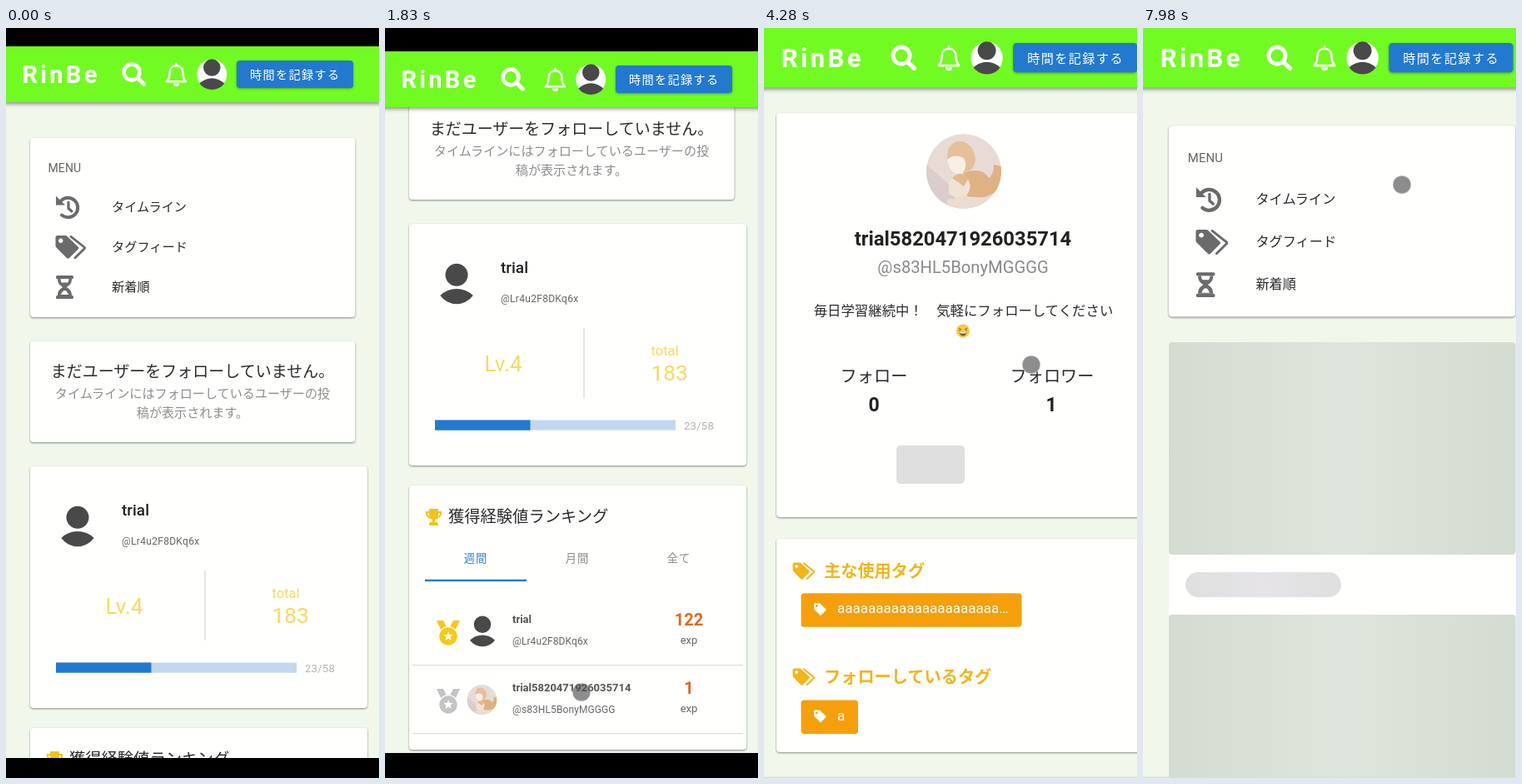
Animation of 448 by 900 pixels, one loop 8 s. Source, as an HTML page:

```html
<!DOCTYPE html>
<html lang="ja">
<head>
<meta charset="utf-8">
<style>
html, body { margin: 0; width: 100%; height: 100%; overflow: hidden; background: #000; }
svg { display: block; width: 448px; height: 900px; font-family: Roboto, "Noto Sans CJK JP", "Noto Sans CJK", sans-serif; }
.card { fill: #fffffe; filter: drop-shadow(0 1.5px 1.2px rgba(0,0,0,.46)); }
.raised { filter: drop-shadow(0 1.5px 1.5px rgba(0,0,0,.35)); }
.bar { filter: drop-shadow(0 2px 2.5px rgba(0,0,0,.45)); }
</style>
</head>
<body>
<svg id="screen" viewBox="0 0 448 900"></svg>
<script>
const ZOOM = 1.066, LOOP = 8000;
const BLUE = '#2379cf', GRAY = '#6b6b6b', GOLD = '#f4b41a', YELLOW = '#f6da5f', ORANGE = '#f5a00b', LIME = '#72fb22', PAGE = '#f1f8eb';
const BRAND = 'RinBe';
const ME = { name: 'trial', id: '@Lr4u2F8DKq6x' };
const OTHER = { name: 'trial5820471926035714', id: '@s83HL5BonyMGGGG' };

// Markup helpers
const text = (x, y, size, str, fill, { w = 400, ls = 0, mid = false } = {}) =>
  `<text x="${x}" y="${y}" font-size="${size}" fill="${fill}" font-weight="${w}" letter-spacing="${ls}"${mid ? ' text-anchor="middle"' : ''}>${str}</text>`;
const rect = (x, y, x2, y2, fill, rx = 0, extra = '') =>
  `<rect x="${x}" y="${y}" width="${x2 - x}" height="${y2 - y}" rx="${rx}" fill="${fill}" ${extra}/>`;
const card = (x, y, x2, y2) => rect(x, y, x2, y2, '#fffffe', 4, 'class="card"');
const path = (d, fill, extra = '') => `<path d="${d}" fill="${fill}" ${extra}/>`;
const line = (d, color, width) => path(d, 'none', `stroke="${color}" stroke-width="${width}" stroke-linecap="round" stroke-linejoin="round"`);
const circle = (x, y, r, fill) => `<circle cx="${x}" cy="${y}" r="${r}" fill="${fill}"/>`;
const at = (x, y, k, body) => `<g transform="translate(${x} ${y}) scale(${k})">${body}</g>`;
const group = (id, body) => `<g id="${id}">${body}</g>`;

// Icons
const person = (x, y, k) => at(x, y, k, circle(0, -20, 25, '#494949') +
  path('M-36.5 26A52 52 0 0 1 36.5 26A45 45 0 0 1 -36.5 26Z', '#494949'));
const photo = (x, y, r) => at(x, y, r / 45, `<g clip-path="url(#round)">` +
  circle(0, 0, 45, '#e8dbd6') +
  path('M-45 -8L-8 24L-16 45H-45Z', '#dacdcc') +
  path('M-20 -16Q-20 -36 -4 -36Q12 -34 14 -14Q12 2 -4 2Q-18 0 -20 -16Z', '#e6c09a') +
  path('M-20 -14Q-12 -22 0 -16Q6 -4 -4 4Q-18 2 -20 -14Z', '#f7eee6') +
  path('M0 2Q22 -6 30 8Q36 4 36 -8L45 -6V16Q34 34 8 32Q-6 24 0 2Z', '#dfb184') +
  path('M-18 14Q-12 0 2 6Q12 16 4 28Q-8 36 -18 26Z', '#f2e2d3') +
  path('M-14 8Q-4 -2 6 8L0 18Q-8 12 -14 8Z', '#e2b88e') +
  path('M-20 34Q10 26 40 36V45H-20Z', '#ecdcd1') + '</g>');
const tag = (x, y, k, fill) => at(x, y, k,
  path('M0 2.5Q0 0 2.5 0H12Q13 0 14 1L27 13.5Q28.5 15 27 16.5L16.5 27Q15 28.5 13.5 27L1 14.5Q0 13.5 0 12ZM6.2 3.6a2.7 2.7 0 1 0 .1 0Z', fill, 'fill-rule="evenodd"'));
const tags = (x, y, k, fill) => tag(x, y, k, fill) + at(x, y, k, line('M18.5 1.3L34.5 14Q35.5 15 34.5 16L23.5 26.8', fill, 2.8));
const history = line('M66 185.5A11.7 11.7 0 1 1 67 202.5', GRAY, 4) + path('M60 179.5V190.5H71Z', GRAY) + line('M75 187V194.5L79 198', GRAY, 3.2);
const hourglass = rect(60, 275, 81, 279, GRAY, 1.5) + rect(60, 299, 81, 303, GRAY, 1.5) +
  path('M62 279C62 286 66 287 68 289C66 291 62 292 62 299H79C79 292 75 291 73 289C75 287 79 286 79 279Z', GRAY) +
  path('M65.5 279H75.5Q75.5 282 74 283.5H67Q65.5 282 65.5 279ZM66 298Q68 293 70.5 293T75 298Z', '#fff');
const trophy = at(48, 846, 1, line('M5 4H1.7Q2 10 7 11M16 4H19.3Q19 10 14 11', '#f2c318', 2) +
  path('M5 0H16V6Q16 12 12 13V16H15Q16 17 16 20H5Q5 17 6 16H9V13Q5 12 5 6Z', '#f2c318'));
const star = Array.from({ length: 10 }, (_, i) => {
  const a = i * Math.PI / 5, r = i % 2 ? 2.6 : 6;
  return `${(r * Math.sin(a)).toFixed(1)},${(-r * Math.cos(a)).toFixed(1)}`;
}).join(' ');
const medal = (x, y, fill) => at(x, y, 1, path('M-14 -19H-6L-1 -9L-8 -6ZM14 -19H6L1 -9L8 -6Z', fill) +
  circle(0, 0, 12, '#fff') + circle(0, 0, 10.7, fill) + `<polygon points="${star}" fill="#fff"/>`);
const laugh = circle(239, 363.5, 8, '#fcc93f') + line('M234 360.3l2.8 1.4l-2.8 1.4M244 360.3l-2.8 1.4l2.8 1.4', '#7d5a20', .9) +
  path('M234.5 365H243.5Q242.5 369.5 239 369.5T234.5 365Z', '#8a5526') + path('M235.3 365H242.7L242.2 366.6H235.8Z', '#fff');

const header = rect(-10, -60, 470, 67, LIME, 0, 'class="bar"') +
  text(19.5, 44, 29, BRAND, '#fff', { w: 700, ls: 3.3 }) +
  group('tools',
    `<circle cx="151" cy="31" r="9.4" fill="none" stroke="#fff" stroke-width="4.6"/>` + line('M158.5 38.5L165.5 45.3', '#fff', 5) +
    line('M193 42.3H216C212 38 212.8 34 212.3 30.5C211.5 20.8 197.5 20.8 196.7 30.5C196.2 34 197 38 193 42.3ZM204.5 20.8V22.5', '#fff', 2.5) +
    path('M200.8 44.6h7.4a3.7 3.5 0 0 1-7.4 0Z', '#fff') +
    circle(247.3, 33.6, 18, '#fff') + person(247.3, 33.8, .41) +
    rect(277, 17, 417, 50, BLUE, 4, 'class="raised"') +
    text(293, 39, 14.2, '時間を記録する', '#fff', { ls: 1.3 }));

const menu = card(29, 110, 419.5, 325) + text(50.5, 151, 14, 'MENU', '#666', { ls: .1 }) +
  history + tags(59.5, 227, 1, GRAY) + hourglass +
  ['タイムライン', 'タグフィード', '新着順'].map((s, i) => text(127, 198 + 48 * i, 15.2, s, '#2b2b2b')).join('');

const rank = (user, y, exp, color) =>
  medal(76, y + 15, color) +
  text(153, y - 1, 13, user.name, '#555', { w: 700 }) + text(153, y + 25, 12, user.id, '#666', { ls: .1 }) +
  text(365, y + 2, 20, exp, '#e0681f', { w: 700, mid: true }) + text(365, y + 24, 13, 'exp', '#666', { mid: true }) +
  rect(33, y + 49, 430, y + 50.2, '#dedede');

const feed = card(29, 354, 419.5, 475) +
  text(224, 397, 19, 'まだユーザーをフォローしていません。', '#2b2b2b', { mid: true }) +
  text(224, 422, 15.1, 'タイムラインにはフォローしているユーザーの投', '#8d8d8d', { mid: true }) +
  text(224, 445, 15.1, '稿が表示されます。', '#8d8d8d', { mid: true }) +
  card(29, 504, 434, 794) + person(86, 576, .54) +
  text(139, 563, 19, ME.name, '#222', { w: 500 }) + text(139, 598, 12, ME.id, '#666', { ls: .3 }) +
  text(119.5, 680.5, 26, 'Lv.4', YELLOW) + rect(238.3, 629, 239.7, 713, '#dcdcdc') +
  text(319.5, 662, 16.5, 'total', YELLOW) + text(319.5, 691.5, 26.3, '183', YELLOW) +
  rect(60, 739.5, 349, 751.7, '#c2d8f0') + rect(60, 739.5, 174.5, 751.7, BLUE) + text(359, 751, 13.2, '23/58', '#b3b3b3', { ls: .2 }) +
  card(29, 818, 434, 1135) + trophy + text(76, 862, 19.3, '獲得経験値ランキング', '#2b2b2b') +
  ['週間', '月間', '全て'].map((s, i) => text(109 + 122 * i, 910, 13.3, s, i ? '#8a8a8a' : '#2f80cf', { ls: .9, mid: true })).join('') +
  rect(48, 930.7, 170, 933.1, BLUE) +
  rank(ME, 984, '122', '#f6c915') + person(117, 993, .41) +
  rank(OTHER, 1066, '1', '#c4c4c4') + photo(116.5, 1075, 18);

const loading = at(0, 0, 1 / ZOOM,
  rect(31, 377, 447.5, 960, '#fffffe', 4) + rect(31, 377, 447.5, 632, 'url(#shimmer)', 4) +
  rect(51, 653, 238, 683, 'url(#pill)', 15) + rect(31, 704, 447.5, 960, 'url(#shimmer)', 4));

// Profile pages, laid out at the zoomed scale
const heading = (y, str) => tags(34.5, y - 17.5, .73, GOLD) + text(72, y, 20.2, str, GOLD, { w: 700 });
const chip = (y, x2, str) => rect(44.5, y, x2, y + 40.5, ORANGE, 4) + tag(60, y + 12, .53, '#fff') + text(88, y + 24, 17, str, '#fff');
const tagCard = (y, used) => {
  const second = y + (used ? 173 : 153);
  return card(15, y, 464, second + 83) + heading(y + 46, '主な使用タグ') +
    (used ? chip(y + 65.2, 309.5, used) : text(35, y + 76, 20.2, 'まだタグがありません。', '#2b2b2b')) +
    heading(second, 'フォローしているタグ') + chip(second + 20.5, 113, 'a');
};
const emptyProfile = card(15, 102, 464, 292) + person(240, 172, 1) + text(239, 258, 20, '@', '#888', { mid: true }) +
  tagCard(317, '') + card(15, 584, 464, 687) +
  text(119, 635, 29, 'Lv.', YELLOW, { w: 700, mid: true }) + text(119.5, 666, 16, 'current Level', YELLOW, { mid: true }) +
  text(359, 617, 16, 'Total EXP', YELLOW, { mid: true });

const button = (id, x, x2, fill, ink, icon, label) => group(id,
  rect(x, 512, x2, 546.5, fill, 4, `stroke="${BLUE}" stroke-width="1.2"`) +
  line(icon, ink, 2.8) + text(x + 44, 534, 15, label, ink, { ls: 1.4 }));
const plus = 'M187.5 528.5H198.5M193 523V534';
const profile = card(15, 102, 464, 587).replace('<rect', '<rect id="profileCard"') + photo(240, 172, 45) +
  text(239, 261, 23.8, OTHER.name, '#222', { w: 700, mid: true }) +
  text(239, 293.5, 20.2, OTHER.id, '#8a8a8a', { mid: true }) +
  text(239.5, 345, 16.4, '毎日学習継続中！　気軽にフォローしてください', '#2b2b2b', { mid: true }) + laugh +
  text(132, 425, 20.2, 'フォロー', '#2b2b2b', { mid: true }) + text(346, 425, 20.2, 'フォロワー', '#2b2b2b', { mid: true }) +
  text(132, 460, 23, '0', '#222', { w: 700, mid: true }) +
  text(345, 460, 23, '1', '#222', { w: 700, mid: true }).replace('<text', '<text id="followers"') +
  group('buttonLoading', rect(159, 501, 241, 547, '#dfdfdf', 5)) +
  button('buttonIdle', 170, 297, '#fff', BLUE, plus, 'フォロー') +
  button('buttonHover', 170, 297, '#bdd8f3', BLUE, plus, 'フォロー') +
  button('buttonDone', 162, 305, BLUE, '#fff', 'M180 529L184 533L191.5 524.5', 'フォロー中') +
  group('tagArea', tagCard(613, 'a'.repeat(21) + '…'));

const gradient = (id, a, b) => `<linearGradient id="${id}"><stop stop-color="${a}"/><stop offset=".5" stop-color="${b}"/><stop offset="1" stop-color="${a}"/></linearGradient>`;
document.getElementById('screen').innerHTML =
  `<defs><clipPath id="round"><circle r="45"/></clipPath>${gradient('shimmer', '#d4dbd1', '#dee5dc')}${gradient('pill', '#dfdfdf', '#e6e4e7')}</defs>` +
  rect(0, 0, 448, 900, PAGE) +
  group('stage', group('home', menu + group('feed', feed) + group('loading', loading)) +
    at(0, 0, 1 / ZOOM, group('emptyProfile', emptyProfile) + group('profile', profile)) + header) +
  group('scrollbar', rect(440, 224, 443, 880, '#b3b5b0', 1.5)) +
  group('edge', rect(0, 898.6, 448, 900, '#d9ddd6')) +
  rect(0, 0, 448, 0, '#000').replace('<rect', '<rect id="topBar"') +
  rect(0, 0, 448, 40, '#000').replace('<rect', '<rect id="bottomBar"') +
  `<circle id="dot" r="10.8" fill="rgba(80,80,80,.65)" stroke="rgba(255,255,255,.22)" stroke-width="1.4"/>`;

const el = Object.fromEntries([...document.querySelectorAll('[id]')].map(n => [n.id, n]));
const show = (id, on) => el[id].setAttribute('visibility', on ? 'inherit' : 'hidden');
const move = (id, x, y, k = 1) => el[id].setAttribute('transform', `translate(${x} ${y}) scale(${k})`);

// Number of steps taken at time t when n steps run from start to end
const taken = (t, start, end, n) => t < start ? 0 : Math.min(n, Math.floor((t - start) / ((end - start) / (n - 1)) + .08) + 1);
const SCROLL = [0, 128, 255, 273, 283, 289, 293, 295, 296, 297];
const smooth = p => p * p * (3 - 2 * p);

// Pointer: start, end, steps, from, to
const MOVES = [
  [1640, 1830, 2, [258, 781], [236, 797]],
  [3120, 3120, 1, [236, 797], [252, 822]],
  [3610, 3610, 1, [321, 404], [321, 404]],
  [5070, 5840, 9, [321, 404], [262, 528]],
  [5930, 6700, 9, [262, 528], [115, 153]],
  [6800, 7100, 4, [115, 153], [62, 42]],
  [7700, 7980, 4, [62, 42], [311, 188]]
];

function pointer(t, scrollStep) {
  if (t < 1640) {
    const fade = [0, 1, 1, .8, .5, .25, 0, 0, 0, 0][scrollStep];
    return [339, scrollStep < 2 ? 465 : 337, fade];
  }
  const [start, end, n, from, to] = MOVES.filter(m => t >= m[0]).pop();
  const p = n === 1 ? 1 : smooth(taken(t, start, end, n) / n);
  const alpha = t >= 3210 && t < 3610 ? (t < 3310 ? .4 : 0) : 1;
  return [from[0] + (to[0] - from[0]) * p, from[1] + (to[1] - from[1]) * p, alpha];
}

function render(t) {
  const zoomed = t >= 3120, returned = t >= 7700;
  const onHome = t < 2430 || returned, loaded = t >= 3210 && !returned;
  const bar = zoomed ? 0 : 22 + 2 * taken(t, 110, 290, 3);
  const step = taken(t, 790, 1540, 9);

  move('stage', 0, bar, zoomed ? ZOOM : 1);
  el.topBar.setAttribute('height', bar);
  el.bottomBar.setAttribute('y', 900 - (zoomed ? 0 : bar + 2));
  move('home', 0, returned ? 0 : -SCROLL[step]);
  move('tools', loaded ? 3.75 : 0, 0);

  show('home', onHome);
  show('feed', onHome && !returned);
  show('loading', returned);
  show('emptyProfile', t >= 2430 && t < 3210);
  show('profile', loaded);
  show('edge', zoomed);
  show('scrollbar', step > 0 && step < 9);
  el.scrollbar.setAttribute('opacity', Math.min(1, (9 - step) / 4));

  const ready = t >= 4670, hover = t >= 5640, done = t >= 6120;
  el.profileCard.setAttribute('height', ready ? 496 : 485);
  move('tagArea', 0, ready ? 10.3 : 0);
  show('buttonLoading', loaded && !ready);
  show('buttonIdle', loaded && ready && !hover);
  show('buttonHover', loaded && hover && !done);
  show('buttonDone', loaded && done);
  el.followers.textContent = done ? 2 : 1;

  const [x, y, alpha] = pointer(t, step);
  move('dot', x, y);
  el.dot.setAttribute('opacity', alpha);
}

function frame() {
  render(performance.now() % LOOP);
  requestAnimationFrame(frame);
}
frame();
</script>
</body>
</html>
```
